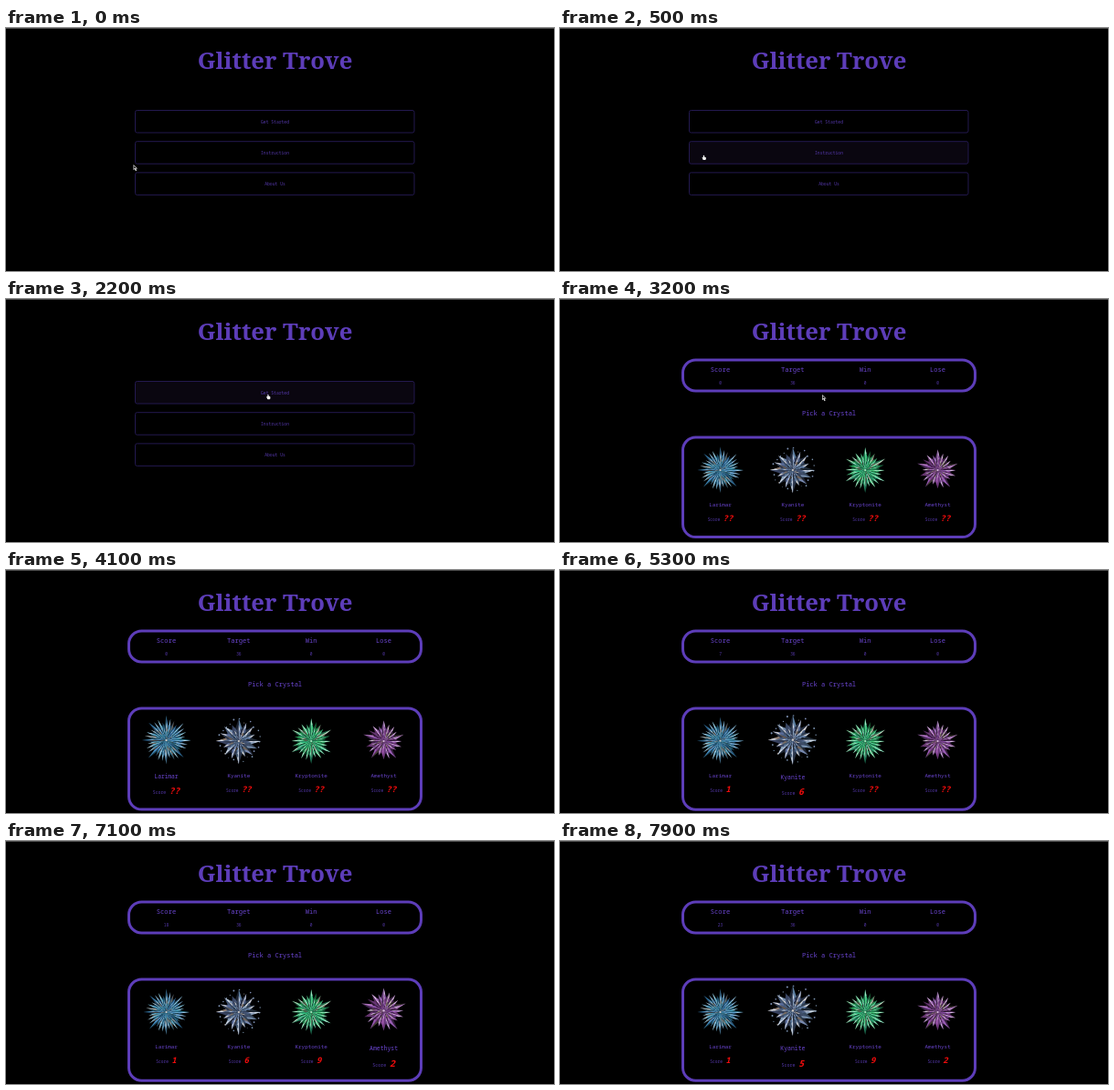
An HTML page with a canvas for the animation above (8000 ms loop, 600x267 px).

```html
<!DOCTYPE html>
<html lang="en">
<head>
<meta charset="utf-8">
<title>Glitter Trove</title>
<style>
html, body { margin: 0; width: 100%; height: 100%; overflow: hidden; background: #000; }
canvas { display: block; width: 600px; height: 267px; }
</style>
</head>
<body>
<canvas id="stage" width="600" height="267"></canvas>
<script>
const ctx = document.getElementById('stage').getContext('2d');
const LOOP = 8000, GAME_START = 2500, CENTER = 294.5;
const VIOLET = '#5d3db9', LABEL = '#6a45d0', FAINT = '#5538ac';
const MONO = '"Noto Sans Mono", monospace';
const CARD_Y = 204, CRYSTAL_Y = 188, BASELINE = 243.6;

const CRYSTALS = [
  { name: 'Larimar', radius: 26.5, rays: 16, hue: 201, sat: 52 },
  { name: 'Kyanite', radius: 25.5, rays: 8, hue: 217, sat: 26, sparks: 24 },
  { name: 'Kryptonite', radius: 25.5, rays: 12, hue: 151, sat: 58 },
  { name: 'Amethyst', radius: 23.5, rays: 10, hue: 284, sat: 36 }
];

// The pointer visits one card after another; each click comes shortly after entering.
const CLICK_DELAY = 280, HOVER_TIME = 500;
const VISITS = [
  { card: 0, enter: 3920, gain: 1 },
  { card: 1, enter: 5000, gain: 6 },
  { card: 2, enter: 5500, gain: 9 },
  { card: 3, enter: 6150, gain: 2 },
  { card: 1, enter: 7200, gain: 5 }
];

const clamp = v => Math.max(0, Math.min(1, v));
const easeOut = p => 1 - (1 - clamp(p)) ** 2;
const smooth = p => { p = clamp(p); return p * p * (3 - 2 * p); };
const column = i => 175.5 + i * 79.35;

function random(seed) {
  return () => (seed = (seed * 16807) % 2147483647) / 2147483647;
}

function text(str, x, y, size, color = LABEL, style = '', family = MONO, align = 'center') {
  ctx.font = `${style} ${size}px ${family}`;
  ctx.textAlign = align;
  ctx.fillStyle = color;
  ctx.fillText(str, x, y);
}

function polygon(points, fill) {
  ctx.beginPath();
  points.forEach(p => ctx.lineTo(...p));
  ctx.closePath();
  ctx.fillStyle = fill;
  ctx.fill();
}

function box(x, y, w, h, r, color, width, fill = 'transparent') {
  ctx.beginPath();
  ctx.roundRect(x, y, w, h, r);
  ctx.fillStyle = fill;
  ctx.fill();
  ctx.strokeStyle = color;
  ctx.lineWidth = width;
  ctx.stroke();
}

function dot(x, y, r, color) {
  ctx.beginPath();
  ctx.arc(x, y, r, 0, Math.PI * 2);
  ctx.fillStyle = color;
  ctx.fill();
}

// Nested rings of two-sided shards, each ring shorter and turned by half a step.
function drawCrystal({ radius, rays, hue, sat, sparks = 0 }) {
  const rand = random(hue * 7919);
  const tone = light => rand() < .12
    ? `hsl(25 12% ${light}%)`
    : `hsl(${hue + rand() * 16 - 8} ${sat}% ${light}%)`;

  for (let i = 0; i < sparks; i++) {
    const angle = (i + rand() * .3) * Math.PI * 2 / sparks;
    const distance = radius * (.78 + rand() * .2);
    dot(Math.cos(angle) * distance, Math.sin(angle) * distance, .4 + rand() * .6, tone(60));
  }
  dot(0, 0, radius * .6, `hsl(${hue} ${sat}% 13%)`);

  for (let ring = 0; ring < 7; ring++) {
    const length = radius * (1 - ring * .135);
    const half = length * .34 * Math.tan(Math.PI / rays);
    for (let i = 0; i < rays; i++) {
      const tip = length * (i % 2 ? .87 : 1) * (1 - rand() * .06);
      const waist = tip * .55;
      ctx.save();
      ctx.rotate((i + ring % 2 / 2) * Math.PI * 2 / rays - Math.PI / 2);
      polygon([[0, 0], [waist, -half], [tip, 0]], tone(14 + rand() * 22));
      polygon([[0, 0], [waist, half], [tip, 0]], tone(30 + rand() * 34));
      if (rand() < .6) polygon([[waist, 0], [tip * .75, half * .45], [tip, 0]], tone(85));
      ctx.restore();
    }
  }
  dot(0, 0, 1.1, tone(80));
}

const leaveTime = i => i + 1 < VISITS.length ? VISITS[i + 1].enter : Infinity;

function hoverAmount(card, t) {
  return clamp(VISITS.reduce((sum, visit, i) => visit.card !== card ? sum : sum
    + easeOut((t - visit.enter) / HOVER_TIME) - easeOut((t - leaveTime(i)) / HOVER_TIME), 0));
}

function drawCard(crystal, index, clicks, t) {
  const scale = 1 + .1 * hoverAmount(index, t);
  const latest = clicks.filter(visit => visit.card === index).pop();
  const value = latest ? String(latest.gain) : '??';
  const left = -(16.9 + value.length * 5.4) / 2;

  ctx.save();
  ctx.translate(column(index), CARD_Y);
  ctx.scale(scale, scale);
  ctx.translate(0, -CARD_Y);
  text(crystal.name, 0, 228, 5.9);
  text('Score', left, BASELINE, 4.5, FAINT, '', MONO, 'left');
  text(value, left + 16.9, BASELINE, 9, '#f00c0c', 'italic bold', MONO, 'left');
  ctx.translate(0, CRYSTAL_Y);
  drawCrystal(crystal);
  ctx.restore();
}

function drawArrow(x, y) {
  ctx.save();
  ctx.translate(x, y);
  polygon([[0, 0], [0, 6.2], [1.4, 5], [2.4, 7.2], [3.7, 6.6], [2.7, 4.5], [4.6, 4.4]], '#d8d8d8');
  polygon([[.7, 1.6], [.7, 4.6], [1.8, 3.9], [3, 3.7]], '#111');
  ctx.restore();
}

function drawHand(x, y) {
  ctx.fillStyle = '#f2f2f2';
  ctx.beginPath();
  ctx.roundRect(x - .7, y, 1.3, 3.5, .6);
  ctx.roundRect(x - 1.2, y + 1.8, 3.6, 3.4, 1.2);
  ctx.fill();
  polygon([[x - 2, y + 2.2], [x - 1, y + 2.2], [x + .5, y + 4.8], [x - .8, y + 4.6]], '#f2f2f2');
}

function drawMenu(t) {
  const a = smooth((t - 150) / 1050), b = smooth((t - 1350) / 650);
  const x = 139.5 + 69 * a + 78.5 * b, y = 150 - 39 * a - 6 * b;
  let pointer = drawArrow;
  ['Get Started', 'Instruction', 'About Us'].forEach((label, i) => {
    const top = 90.5 + i * 34.2;
    const hover = x > 142 && y > top && y < top + 24.5;
    if (hover) pointer = drawHand;
    box(141.5, top, 305.5, 24.5, 2, '#23194f', 1, hover ? '#0a0610' : '#000');
    text(label, CENTER, top + 14, 4.7, FAINT);
  });
  pointer(x, y);
}

function drawGame(t) {
  const clicks = VISITS.filter(visit => visit.enter + CLICK_DELAY <= t);
  const score = clicks.reduce((sum, visit) => sum + visit.gain, 0);

  box(134.5, 67, 320, 34, 14, VIOLET, 3);
  Object.entries({ Score: score, Target: 36, Win: 0, Lose: 0 }).forEach(([label, value], i) => {
    text(label, column(i), 79.6, 7.1);
    text(value, column(i), 93.6, 4.5, FAINT);
  });
  text('Pick a Crystal', CENTER, 128.2, 7.05);

  // The panel stretches a little once a card is enlarged.
  const stretch = 1.6 * easeOut((t - VISITS[0].enter) / HOVER_TIME * 2);
  box(134.5, 152, 320, 109.6 + stretch, 14, VIOLET, 3);
  CRYSTALS.forEach((crystal, i) => drawCard(crystal, i, clicks, t));

  if (t < VISITS[0].enter) {
    const p = smooth((t - 3200) / 760);
    drawArrow(287 - 108 * p, 105 + 62 * p);
  }
}

function draw(t) {
  ctx.fillStyle = '#000';
  ctx.fillRect(0, 0, 600, 267);
  ctx.fillStyle = '#484848';
  ctx.fillRect(0, 0, 600, 1);
  text('Glitter Trove', CENTER, 44.6, 25.7, VIOLET, 'bold', '"Noto Serif", serif');
  (t < GAME_START ? drawMenu : drawGame)(t);
}

function tick() {
  draw(performance.now() % LOOP);
  requestAnimationFrame(tick);
}
tick();
</script>
</body>
</html>
```
